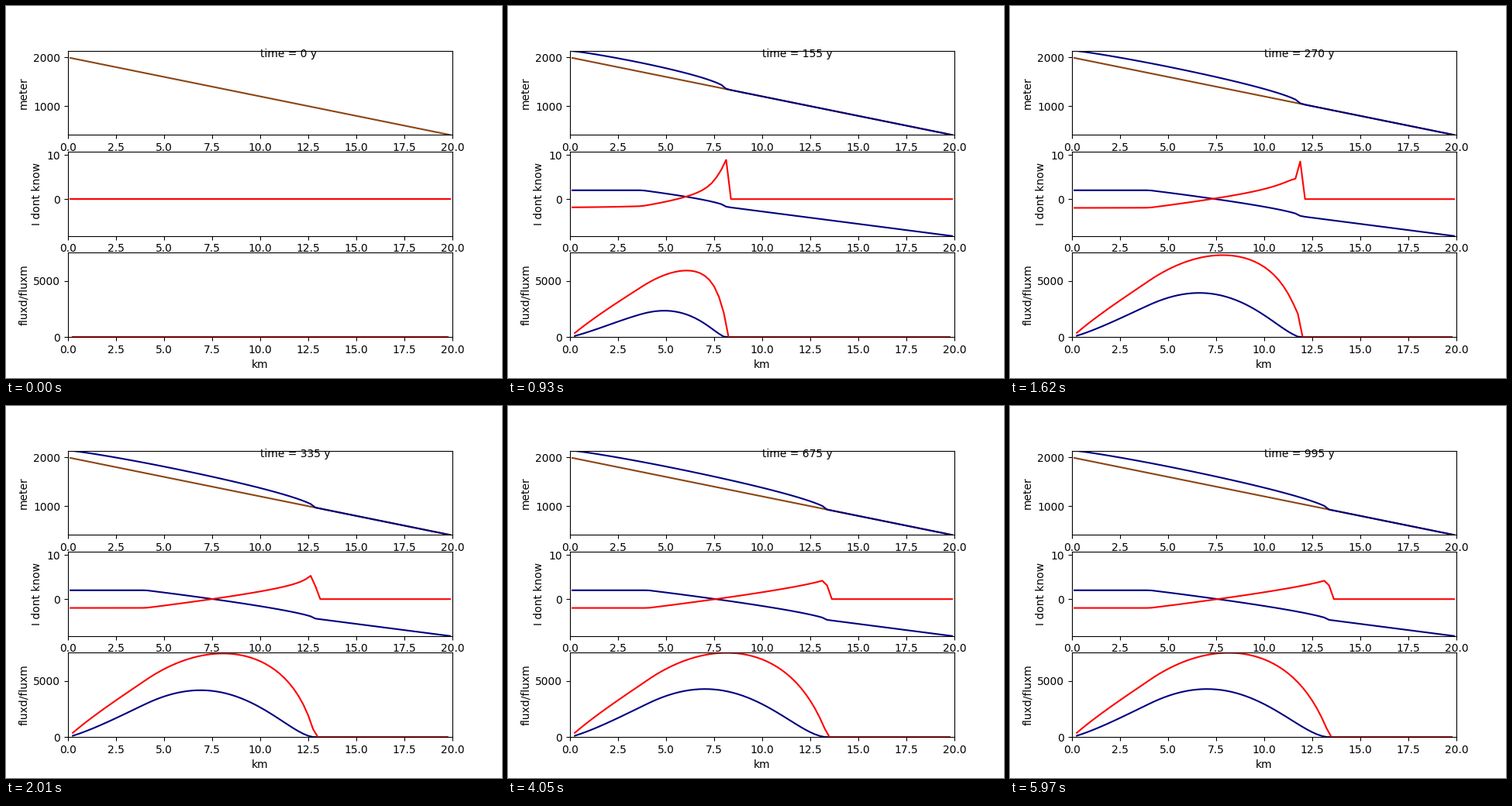
Write a matplotlib script that moves like this. It is 640 px wide and 480 px high and loops after 6000 ms.

```python
import numpy as np
import matplotlib.pyplot as plt
from matplotlib.animation import FuncAnimation

# Valley glacier growing on a sloping bed (deformation + sliding flow)
FRAMES = 200
YEARS_PER_FRAME = 5
DT = 0.025                      # years
DX = 250.0                      # m
LENGTH = 20000.0                # m
YEAR = 3.156e7                  # s
RHO_G = 917 * 9.81
DEFORM = 0.4 * 1.9e-24 * YEAR   # Pa^-3 y^-1
SLIDE = 5.7e-20 * YEAR          # Pa^-3 m^2 y^-1
ELA, GAMMA, MAX_BALANCE = 1600.0, 0.007, 2.0

x = np.arange(DX / 2, LENGTH, DX)
edges = x[:-1] + DX / 2
bed = 2000 - 0.08 * x


def simulate():
    """Surface, balance, -dQ/dx and both fluxes for every frame."""
    ice = np.zeros_like(x)
    total = np.zeros(x.size + 1)
    rows = [(np.zeros_like(x), np.zeros_like(x), np.zeros_like(x),
             np.zeros_like(edges), np.zeros_like(edges))]
    per_frame = round(YEARS_PER_FRAME / DT)
    for step in range((FRAMES - 1) * per_frame + 1):
        surface = bed + ice
        balance = np.minimum(GAMMA * (surface - ELA), MAX_BALANCE)
        mid = 0.5 * (ice[1:] + ice[:-1])
        stress = RHO_G * mid * (surface[:-1] - surface[1:]) / DX
        cubed = stress * stress * stress
        slide = SLIDE * cubed
        deform = DEFORM * cubed * mid * mid
        total[1:-1] = slide + deform
        gain = (total[:-1] - total[1:]) / DX
        if step and step % per_frame == 0:
            rows.append((surface, balance, gain, deform, slide))
        ice = np.maximum(ice + (balance + gain) * DT, 0)
    return [np.array(column) for column in zip(*rows)]


surface, balance, gain, deform, slide = simulate()

fig, (top, middle, bottom) = plt.subplots(3, 1, figsize=(6.4, 4.8), dpi=100)
km, edge_km = x / 1000, edges / 1000

top.plot(km, bed, color="saddlebrown")
lines = [
    (top.plot(km, surface[0], color="navy")[0], surface),
    (middle.plot(km, balance[0], color="navy")[0], balance),
    (middle.plot(km, gain[0], color="red")[0], gain),
    (bottom.plot(edge_km, deform[0], color="navy")[0], deform),
    (bottom.plot(edge_km, slide[0], color="red")[0], slide),
]
clock = top.text(10, 2008, "")

top.set_ylim(bed.min(), surface.max())
middle.set_ylim(-8.33, 10.7)
bottom.set_ylim(0, slide.max())
for ax, label in ((top, "meter"), (middle, "I dont know"),
                  (bottom, "fluxd/fluxm")):
    ax.set_xlim(0, 20)
    ax.set_ylabel(label)
bottom.set_xlabel("km")


def update(i):
    for line, values in lines:
        line.set_ydata(values[i])
    clock.set_text(f"time = {i * YEARS_PER_FRAME} y")
    return [line for line, _ in lines] + [clock]


anim = FuncAnimation(fig, update, frames=FRAMES, interval=30,
                     repeat=True, repeat_delay=0)
plt.show()
```
